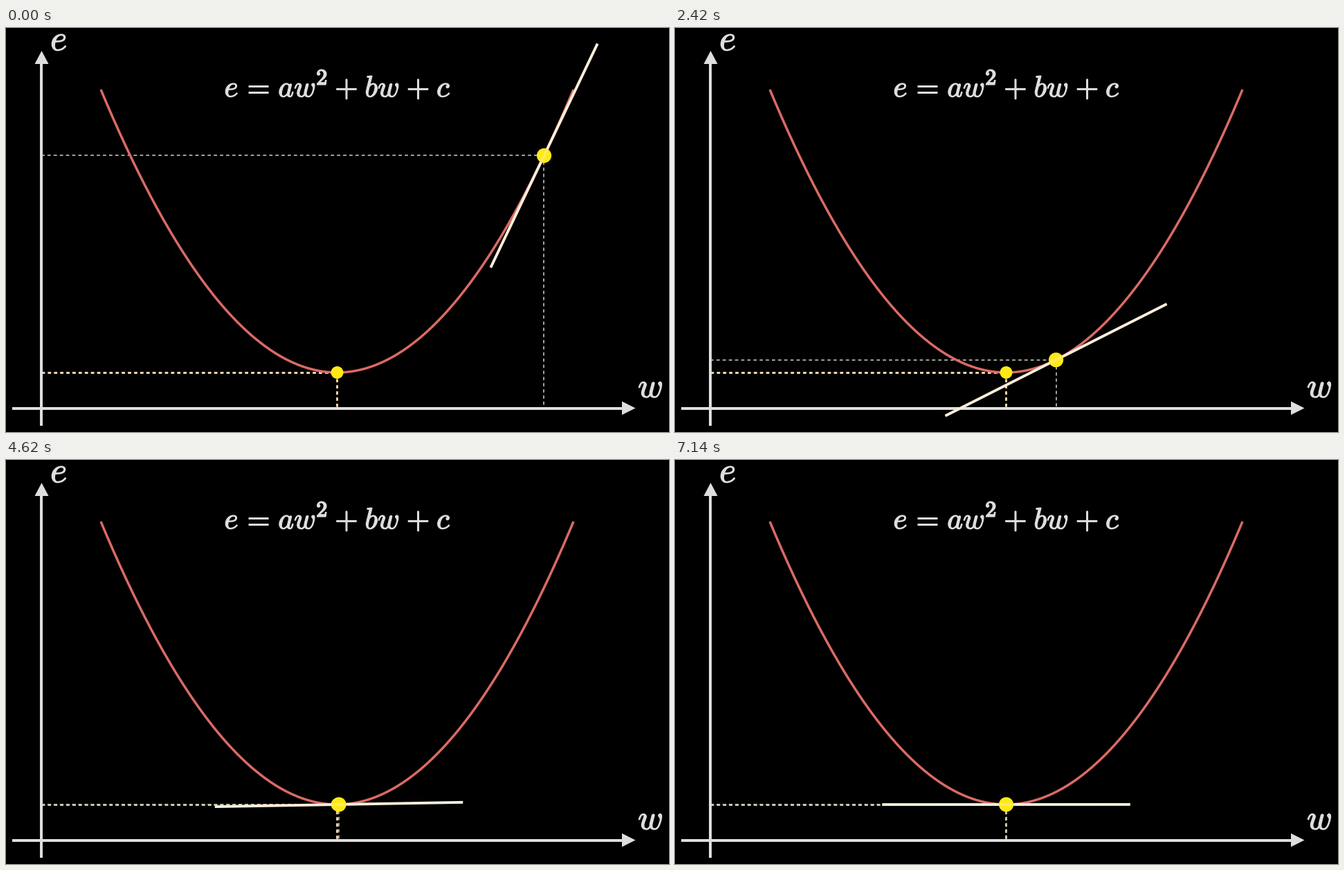
A matplotlib script for the animation above (7.87 s loop, 958 px wide and 584 px high).

```python
import numpy as np
import matplotlib.pyplot as plt
from matplotlib.animation import FuncAnimation
from matplotlib.patches import Circle, PathPatch, Polygon
from matplotlib.textpath import TextPath
from matplotlib.transforms import Affine2D

W, H, DPI = 958, 584, 100
LOOP, FRAMES = 7870, 118
PX = 72 / DPI                     # points per pixel

WHITE = "#dedede"
CURVE = "#da6b64"
CREAM = "#fdeedb"
GUIDE = "#f5d9b2"
DIM = "#b9bcae"
YELLOW = "#ffea16"

plt.rcParams["mathtext.fontset"] = "cm"
plt.rcParams["lines.scale_dashes"] = False

# Parabola in stage pixels
VX, VY, REACH, RISE = 478.5, 498, 341.5, 409
BEND = RISE / REACH ** 2
AXIS_X, AXIS_Y = 51.5, 549.5

# Gradient descent: each step shrinks the distance to the minimum
START, STEP, STOP = 1614, 1000, 7140
FIRST, SHRINK = 299, 0.203
HALF_TANGENT = 179.3

fig = plt.figure(figsize=(W / DPI, H / DPI), dpi=DPI, facecolor="black")
ax = fig.add_axes([0, 0, 1, 1])
ax.set_xlim(0, W)
ax.set_ylim(H, 0)
ax.axis("off")


def line(x, y, color, width, z, **kw):
    kw.setdefault("solid_capstyle", "butt")
    return ax.plot(x, y, color=color, lw=width * PX, zorder=z, **kw)[0]


def dashed(x, y, color, width, z):
    return line(x, y, color, width, z, dash_capstyle="butt",
                linestyle=(0, (4.8 * PX, 4.1 * PX)))


def glyph(s, x, base, size, weight=1.3):
    path = TextPath((0, 0), f"${s}$", size=size)
    path = path.transformed(Affine2D().scale(1, -1).translate(x, base))
    ax.add_patch(PathPatch(path, fc=WHITE, ec=WHITE, lw=weight * PX, zorder=6))


def dot(radius, z):
    return ax.add_patch(Circle((VX, VY), radius, fc=YELLOW, ec="none", zorder=z))


def smooth(t, k=10):
    def sig(v):
        return 1 / (1 + np.exp(-v))
    edge = sig(-k / 2)
    return np.clip((sig(k * (t - 0.5)) - edge) / (1 - 2 * edge), 0, 1)


def draw_axes():
    line([AXIS_X] * 2, [575, 50], WHITE, 4, 2)
    line([9, 892], [AXIS_Y] * 2, WHITE, 4, 2)
    for tri in ([(AXIS_X, 33), (41.5, 52), (61.5, 52)],
                [(909.5, AXIS_Y), (890, 539.7), (890, 559.3)]):
        ax.add_patch(Polygon(tri, fc=WHITE, ec="none", zorder=2))
    glyph("e", 64, 32.5, 52)
    glyph("w", 913, 534, 50)


def draw_formula():
    size, left, base = 43.25, 315.4, 99.5
    # pen positions in em, following the usual math spacing
    for s, em in (("e", 0), ("a", 1.8), ("w", 2.329), ("+", 3.694),
                  ("b", 4.694), ("w", 5.123), ("+", 6.088), ("c", 7.088)):
        glyph(s, left + em * size, base, size)
    glyph("2", left + 3.072 * size, 81.8, 32, 1.8)
    for y in (84.3, 92.9):
        line([349.8, 379.2], [y, y], WHITE, 3, 6)


draw_axes()
draw_formula()

xs = np.linspace(-REACH, REACH, 300)
line(VX + xs, VY - BEND * xs ** 2, CURVE, 3.5, 3)

dashed([AXIS_X, VX], [VY, VY], GUIDE, 2.9, 1)
dashed([VX, VX], [VY, AXIS_Y], GUIDE, 2.9, 1)
dot(9, 4)

h_guide = dashed([], [], DIM, 1.7, 1.5)
v_guide = dashed([], [], DIM, 1.7, 1.5)
tangent = line([], [], CREAM, 3.9, 5)
ball = dot(10.6, 5.5)
glint = line([], [], CREAM, 3.9, 5.6, alpha=0.4)


def offset(t):
    s = max(0, (min(t, STOP) - START) / STEP)
    k = int(s)
    return FIRST * SHRINK ** k * (1 + (SHRINK - 1) * smooth(s - k))


def update(i):
    d = offset(i * LOOP / FRAMES)
    x, y = VX + d, VY - BEND * d * d
    angle = np.arctan(-2 * BEND * d)
    ux, uy = np.cos(angle), np.sin(angle)
    for art, r in ((tangent, HALF_TANGENT), (glint, 9.5)):
        art.set_data([x - r * ux, x + r * ux], [y - r * uy, y + r * uy])
    h_guide.set_data([AXIS_X, x], [y, y])
    v_guide.set_data([x, x], [y, AXIS_Y])
    ball.center = (x, y)
    return h_guide, v_guide, tangent, ball, glint


anim = FuncAnimation(fig, update, frames=FRAMES, interval=LOOP / FRAMES,
                     repeat=True, repeat_delay=0, blit=False)
plt.show()
```
